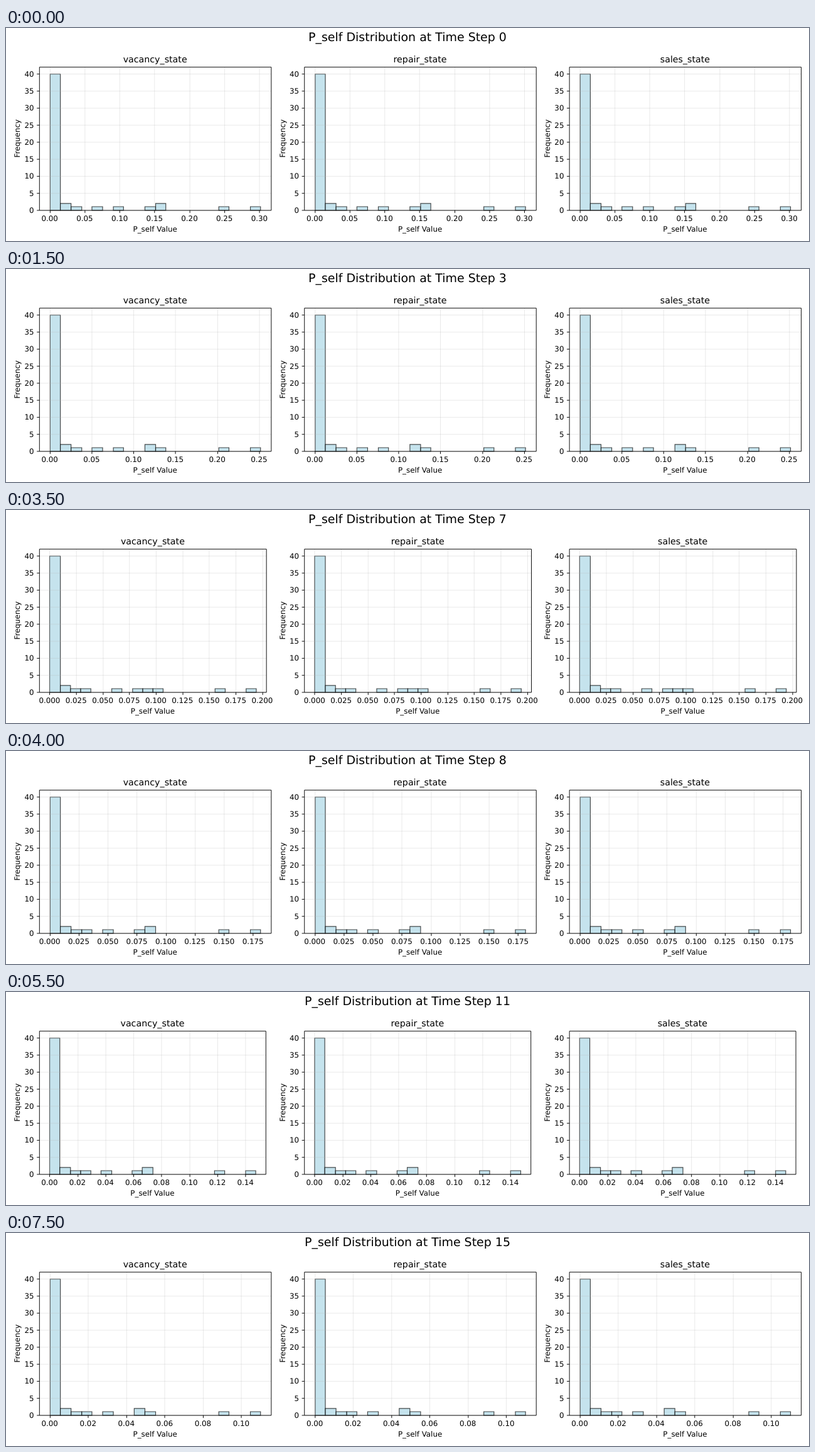
These frames come from a looping animation (1280 by 341 pixels, 8 s). An HTML page:

```html
<!DOCTYPE html>
<html lang="en">
<head>
<meta charset="utf-8">
<title>P_self distribution</title>
<style>
html, body { margin: 0; width: 100%; height: 100%; overflow: hidden; background: #fff; }
svg { display: block; width: 1280px; height: 341px; font: 13.89px "DejaVu Sans", Verdana, sans-serif; }
text { text-anchor: middle; text-rendering: geometricPrecision; }
.bar { fill: #add8e6; stroke: #000; stroke-width: 1.39; fill-opacity: .7; stroke-opacity: .7; }
.grid { stroke: #b0b0b0; stroke-opacity: .3; stroke-width: 1.11; }
.axis { stroke: #000; stroke-width: 1.11; fill: none; }
</style>
</head>
<body>
<svg id="chart" viewBox="0 0 1500 400" preserveAspectRatio="none"></svg>
<script>
const chart = document.getElementById('chart');
const STEP_MS = 500, STEPS = 16, BINS = 20;
const LEFT = 62, PITCH = 495, TOP = 73.33, BOTTOM = 341.7, FULL_WIDTH = 433, DRAFT_WIDTH = 341.9;
const Y_MAX = 42, FONT = 13.89, TICK = 4.86;
const NAMES = ['vacancy_state', 'repair_state', 'sales_state'];
// Odds of the non-negligible values, relative to the largest one
const ODDS = [1, .79, .45, .416, .382, .2596, .159, .1, .056, .054];
const NEAR_ZERO = 40;

const snap = v => Math.round(v) + .5;
const yPos = v => BOTTOM - v * (BOTTOM - TOP) / Y_MAX;
const line = (cls, x1, y1, x2, y2) => `<path class="${cls}" d="M${x1} ${y1}L${x2} ${y2}"/>`;
const rect = (cls, x1, y1, x2, y2) => `<path class="${cls}" d="M${x1} ${y2}V${y1}H${x2}V${y2}Z"/>`;
const text = (x, y, s, attrs = '') => `<text x="${x}" y="${y}" ${attrs}>${s}</text>`;

function niceTicks(max, intervals) {
  const raw = 1.1 * max / intervals;
  const power = 10 ** Math.floor(Math.log10(raw));
  const step = [1, 2, 2.5, 5, 10].find(k => k * power >= raw) * power;
  const digits = Number.isInteger(+(step * 100).toFixed(6)) ? 2 : 3;
  return { step, digits, count: Math.floor(1.05 * max / step) + 1 };
}

// Room needed right of the axes for the last tick label
function overhang(max) {
  const { step, digits, count } = niceTicks(max, 8);
  const halfLabel = ((.954 + .636 * digits) * FONT - 1) / 2;
  const gap = (1.05 * max - (count - 1) * step) / (1.1 * max) * DRAFT_WIDTH;
  return Math.max(0, halfLabel - gap);
}

function histogram(topOdds, max) {
  const counts = Array(BINS).fill(0);
  counts[0] = NEAR_ZERO;
  for (const ratio of ODDS) {
    const odds = ratio * topOdds, value = odds / (1 + odds);
    counts[Math.min(BINS - 1, Math.floor(value / max * BINS))]++;
  }
  return counts;
}

function panel(name, left, width, max, counts) {
  const xPos = v => left + (v / max + .05) / 1.1 * width;
  const right = snap(left + width), l = snap(left), t = snap(TOP), b = snap(BOTTOM);
  const mid = left + width / 2;
  let bars = '', grid = '', marks = '';
  counts.forEach((n, i) => {
    if (n) bars += rect('bar', snap(xPos(i * max / BINS)), snap(yPos(n)), snap(xPos((i + 1) * max / BINS)), b);
  });
  const { step, digits, count } = niceTicks(max, 9);
  for (let i = 0; i < count; i++) {
    const x = xPos(i * step), sx = snap(x);
    grid += line('grid', sx, t, sx, b);
    marks += line('axis', sx, b, sx, b + TICK) + text(x, 362.2, (i * step).toFixed(digits));
  }
  for (let v = 0; v <= 40; v += 5) {
    const y = snap(yPos(v));
    grid += line('grid', l, y, right, y);
    marks += line('axis', l - TICK, y, l, y) + text(left - 9.7, yPos(v) + 5.3, v, 'style="text-anchor:end"');
  }
  const yLabel = `translate(${left - 36} ${(TOP + BOTTOM) / 2}) rotate(-90)`;
  return bars + grid + marks + rect('axis', l, t, right, b)
    + text(mid, 65, name, 'font-size="16.67"')
    + text(mid, 382, 'P_self Value')
    + text(0, 0, 'Frequency', `transform="${yLabel}"`);
}

function draw(step) {
  const topOdds = Math.exp(-.84 - step / 12);
  const max = topOdds / (1 + topOdds);
  const width = FULL_WIDTH - overhang(max);
  const counts = histogram(topOdds, max);
  chart.innerHTML = text(750, 24.8, `P_self Distribution at Time Step ${step}`, 'font-size="22.22"')
    + NAMES.map((name, i) => panel(name, LEFT + i * PITCH, width, max, counts)).join('');
}

let shown = -1;
function tick() {
  const step = Math.floor(performance.now() / STEP_MS) % STEPS;
  if (step !== shown) draw(shown = step);
  requestAnimationFrame(tick);
}
tick();
</script>
</body>
</html>
```
